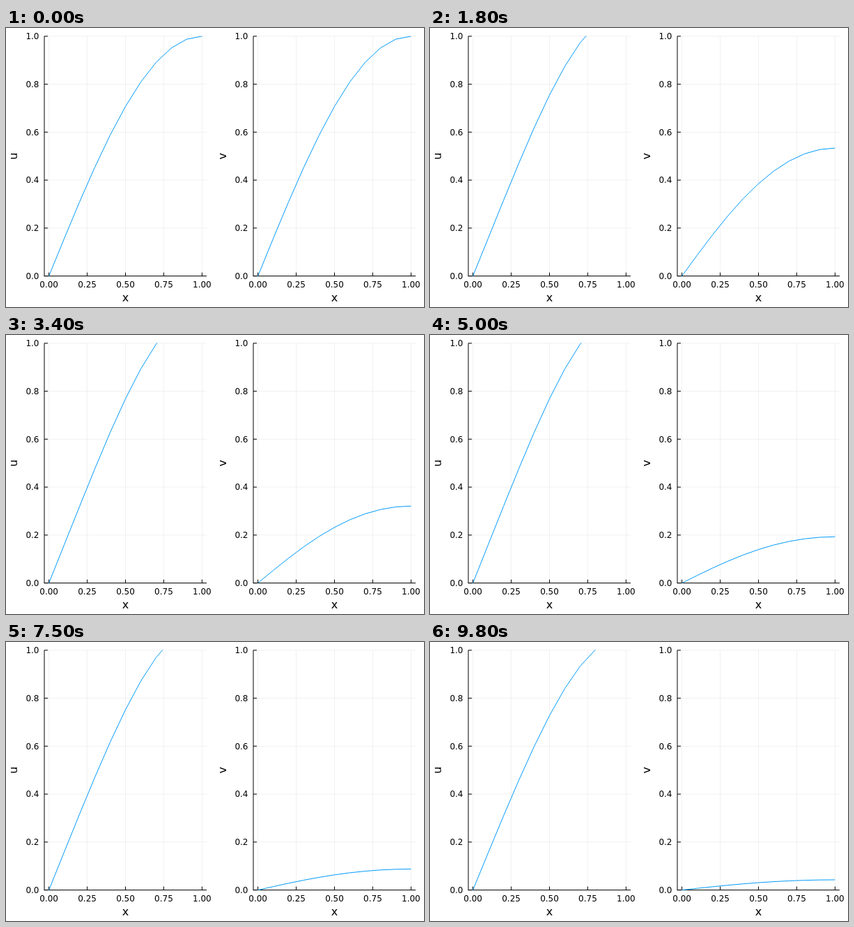
Animation, 600 px wide and 400 px high, one loop 9.9 s. Source, as an HTML page with a canvas:

```html
<!DOCTYPE html>
<html lang="en">
<head>
<meta charset="utf-8">
<title>Coupled diffusion</title>
<style>
html, body { margin: 0; width: 100%; height: 100%; overflow: hidden; background: #fff; }
canvas { display: block; }
</style>
</head>
<body>
<canvas id="stage" width="600" height="400"></canvas>
<script>
const ctx = document.getElementById('stage').getContext('2d');
const STEP_MS = 100, STEPS = 99;
const LEFT = 55, RIGHT = 288, TOP = 11.8, BOTTOM = 355.6;
const px = x => 61.6 + 219.8 * x;
const py = y => BOTTOM + (TOP - BOTTOM) * y;

// u_t = Du u_xx + uv,  v_t = Dv v_xx - uv,  zero at x = 0, no flux at x = 1
const N = 10, DU = 0.0875, DV = 0.905, DT = 0.0002;

function advance(u, v) {
  const next = [[0], [0]];
  for (let i = 1; i < N; i++) {
    const lap = a => (a[i - 1] - 2 * a[i] + a[i + 1]) * N * N;
    const reaction = u[i] * v[i];
    next[0][i] = u[i] + DT * (DU * lap(u) + reaction);
    next[1][i] = v[i] + DT * (DV * lap(v) - reaction);
  }
  for (const a of next) a[N] = (4 * a[N - 1] - a[N - 2]) / 3;
  return next;
}

// The first solver steps are longer than the later, even ones
const modelTime = n => 0.01 * n + 0.018 * (1 - Math.exp(-n / 4));

function solve() {
  const start = Array.from({ length: N + 1 }, (_, i) => Math.sin(Math.PI * i / N / 2));
  let state = [start, start], done = 0;
  return Array.from({ length: STEPS }, (_, n) => {
    for (const goal = Math.round(modelTime(n) / DT); done < goal; done++) state = advance(...state);
    return state;
  });
}

function line(x1, y1, x2, y2, color, width) {
  ctx.strokeStyle = color;
  ctx.lineWidth = width;
  ctx.beginPath();
  ctx.moveTo(x1, y1);
  ctx.lineTo(x2, y2);
  ctx.stroke();
}

function text(label, x, y, size, align) {
  ctx.font = `${size}px "DejaVu Sans", sans-serif`;
  ctx.textAlign = align;
  ctx.fillText(label, x, y);
}

function drawAxes(name) {
  const grid = 'rgba(0,0,0,0.1)';
  ctx.fillStyle = '#000';
  for (let i = 0; i <= 4; i++) line(px(i / 4), TOP, px(i / 4), BOTTOM, grid, 0.6);
  for (let i = 0; i <= 5; i++) line(LEFT, py(i / 5), RIGHT, py(i / 5), grid, 0.6);
  line(LEFT - 0.5, BOTTOM, RIGHT, BOTTOM, '#000', 1);
  line(LEFT, TOP, LEFT, BOTTOM, '#000', 1);
  for (let i = 0; i <= 4; i++) {
    line(px(i / 4), BOTTOM, px(i / 4), BOTTOM - 5, '#000', 1);
    text((i / 4).toFixed(2), px(i / 4), 371.5, 12, 'center');
  }
  for (let i = 0; i <= 5; i++) {
    line(LEFT, py(i / 5), LEFT + 5, py(i / 5), '#000', 1);
    text((i / 5).toFixed(1), 47.5, py(i / 5) + 4.4, 12, 'right');
  }
  text('x', px(0.5), 391.5, 16, 'center');
  ctx.save();
  ctx.translate(16, py(0.5));
  ctx.rotate(-Math.PI / 2);
  text(name, 0, 0, 16, 'center');
  ctx.restore();
}

function drawCurve(values) {
  ctx.save();
  ctx.beginPath();
  ctx.rect(LEFT, TOP - 0.5, RIGHT - LEFT, BOTTOM - TOP + 1);
  ctx.clip();
  ctx.strokeStyle = '#009afa';
  ctx.lineWidth = 1;
  ctx.beginPath();
  values.forEach((y, i) => ctx.lineTo(px(i / N), py(y)));
  ctx.stroke();
  ctx.restore();
}

const states = solve();

function render() {
  const state = states[Math.floor(performance.now() / STEP_MS) % STEPS];
  ctx.fillStyle = '#fff';
  ctx.fillRect(0, 0, 600, 400);
  ['u', 'v'].forEach((name, i) => {
    ctx.save();
    ctx.translate(300 * i, 0);
    drawAxes(name);
    drawCurve(state[i]);
    ctx.restore();
  });
  requestAnimationFrame(render);
}
render();
</script>
</body>
</html>
```
